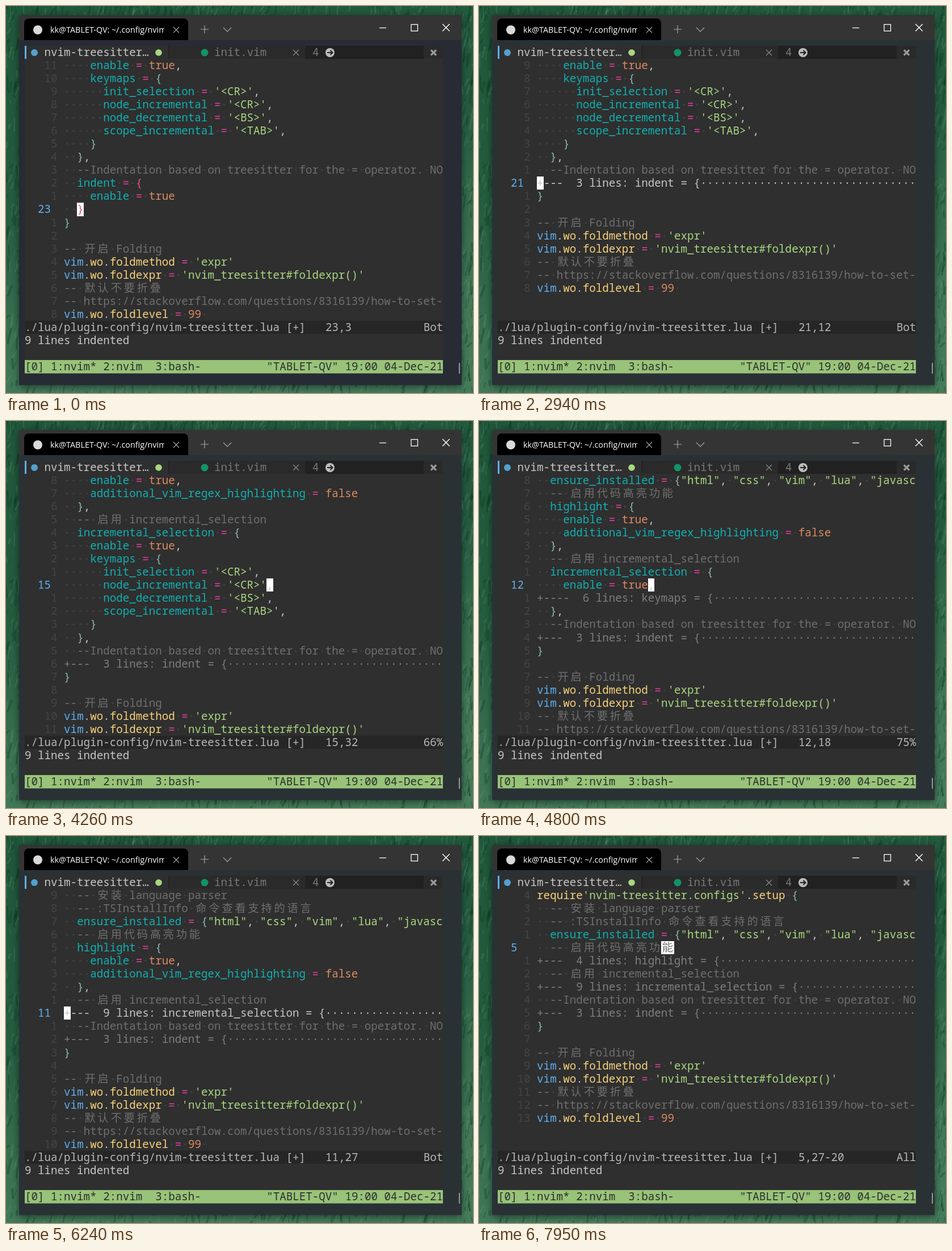
These frames come from a looping animation (823 by 681 pixels, 8 s). An HTML page with a canvas:

```html
<!DOCTYPE html>
<html lang="zh-CN">
<head>
<meta charset="utf-8">
<title>Folding in nvim</title>
<style>
  html, body { margin: 0; width: 100%; height: 100%; overflow: hidden; background: #2b6144; }
  #stage { position: absolute; left: 0; top: 0; width: 823px; height: 681px; overflow: hidden; }
  canvas { position: absolute; left: 0; top: 0; }
  #title { position: absolute; left: 78px; top: 32px; width: 201px; height: 20px; overflow: hidden;
    font: 14.4px/20px "Open Sans", "Noto Sans", sans-serif; color: #fff; white-space: pre; }
  #term { position: absolute; left: 33px; top: 70px; width: 737px; height: 576.5px; overflow: hidden;
    font: 19.2px/21.04px "Noto Sans Mono", "Noto Sans CJK SC", "Noto Sans CJK", "DejaVu Sans Mono", monospace;
    font-variant-ligatures: none; color: #c6c6c6; }
  .line { position: absolute; white-space: pre; height: 23.04px; }
  .wide { display: inline-block; width: 23.04px; text-align: center; }
  .cursor { display: inline-block; height: 23.04px; background: #fff; }
  .comment { color: #6f6f6f; }
  .dot { color: #484848; }
  .field { color: #10b0b2; }
  .string { color: #a9d880; }
  .value { color: #dc8a62; }
  .op { color: #dd3f9c; }
  .brace { color: #8cb6ac; }
  .match { color: #e0558c; }
  .blue { color: #5fb0f2; }
  .yellow { color: #f8d27a; }
  .fold { color: #7e7e7e; }
  .rel { color: #444; }
  .bar { color: #b8b8b8; }
  .tmux { color: #2b2f2b; }
  .dim { color: #777; }
</style>
</head>
<body>
<div id="stage">
  <canvas width="823" height="681"></canvas>
  <div id="title">kk@TABLET-QV: ~/.config/nvim</div>
  <div id="term"></div>
</div>
<script>
const LOOP = 8000, CELL = 11.52, ROW = 23.04, COLS = 58, ROWS = 20;
const term = document.getElementById('term');
const ctx = document.querySelector('canvas').getContext('2d');

const source = `require'nvim-treesitter.configs'.setup {
  -- 安装 language parser
  -- :TSInstallInfo 命令查看支持的语言
  ensure_installed = {"html", "css", "vim", "lua", "javascript"},
  -- 启用代码高亮功能
  highlight = {
    enable = true,
    additional_vim_regex_highlighting = false
  },
  -- 启用 incremental_selection
  incremental_selection = {
    enable = true,
    keymaps = {
      init_selection = '<CR>',
      node_incremental = '<CR>',
      node_decremental = '<BS>',
      scope_incremental = '<TAB>',
    }
  },
  --Indentation based on treesitter for the = operator. NO
  indent = {
    enable = true
  }
}

-- 开启 Folding
vim.wo.foldmethod = 'expr'
vim.wo.foldexpr = 'nvim_treesitter#foldexpr()'
-- 默认不要折叠
-- https://stackoverflow.com/questions/8316139/how-to-set-
vim.wo.foldlevel = 99 `.split('\n');

// first line, last line, level, time of closing
const folds = [[21, 23, 2, 2940], [13, 18, 3, 4470], [11, 19, 2, 6240], [6, 9, 2, 7740]];
const pairs = { 21: 23, 23: 21, 11: 19 };

// time, cursor line, top line
const moves = [
  [0, 23, 12], [1920, 22, 12], [2070, 21, 12], [3150, 20, 12], [3330, 19, 11],
  [3480, 18, 10], [3630, 17, 9], [3810, 16, 8], [4020, 15, 7], [4470, 13, 5],
  [4800, 12, 4], [4920, 11, 3], [5070, 10, 2], [5490, 11, 2], [6750, 10, 2],
  [6900, 9, 1], [7050, 8, 1], [7740, 6, 1], [7950, 5, 1]
];
const SCROLL_OFF = 120, SCROLL_ON = 2280, TINT = 570;
const changes = [...moves.map(m => m[0]), ...folds.map(f => f[3]), SCROLL_OFF, SCROLL_ON, TINT];

const isWide = c => c > '\u2e80';
const bytes = s => new TextEncoder().encode(s).length;

function kind(tok) {
  if (/^['"]/.test(tok)) return 'string';
  if (/^(true|false|\d+)$/.test(tok)) return 'value';
  if (tok === '=') return 'op';
  if (/[{}]/.test(tok)) return 'brace';
  if (tok === 'vim') return 'blue';
  if (/^(require|setup|wo|fold\w+)$/.test(tok)) return 'yellow';
  return /^\w/.test(tok) ? 'field' : '';
}

// a line as a list of [character, class]
function highlight(line) {
  const cells = [], comment = /^\s*--/.test(line);
  const tokens = comment ? [line] : line.match(/'[^']*'|"[^"]*"|\w+|./g) || [];
  for (const tok of tokens) {
    const cls = comment ? 'comment' : kind(tok);
    for (const c of tok) cells.push(c === ' ' ? ['·', 'dot'] : [c, cls]);
  }
  return cells;
}

function span(parent, text, cls) {
  const el = document.createElement('span');
  el.textContent = text;
  el.className = cls;
  parent.append(el);
}

function lineAt(row, col) {
  const el = document.createElement('div');
  el.className = 'line';
  el.style.left = col * CELL + 'px';
  el.style.top = row * ROW + 'px';
  term.append(el);
  return el;
}

const put = (row, col, text, cls = '') => span(lineAt(row, col), text, cls);

function putCells(row, cells, cursorAt) {
  const el = lineAt(row, 6);
  let run = '', runCls = '';
  const flush = () => { if (run) span(el, run, runCls); run = ''; };
  cells.forEach(([c, cls], i) => {
    if (i === cursorAt || isWide(c)) {
      flush();
      span(el, c, cls + (isWide(c) ? ' wide' : '') + (i === cursorAt ? ' cursor' : ''));
      return;
    }
    if (cls !== runCls) flush();
    runCls = cls;
    run += c;
  });
  flush();
}

function ruler(n) {
  const head = source[n - 1].slice(0, -1);
  const col = bytes(head) + 1;
  const virt = [...head].reduce((w, c) => w + (isWide(c) ? 2 : 1), 1);
  return n + ',' + col + (virt === col ? '' : '-' + virt);
}

function position(top, next) {
  const above = top - 1, below = source.length - next + 1;
  if (!below) return above ? 'Bot' : 'All';
  return above ? Math.floor(100 * above / (above + below)) + '%' : 'Top';
}

function drawText(t) {
  term.textContent = '';
  const [, cur, top] = moves.filter(m => m[0] <= t).pop();
  const closed = folds.filter(f => f[3] <= t);
  const foldAt = n => closed.find(f => f[0] === n);

  const shown = [];
  let n = top;
  while (n <= source.length && shown.length < ROWS) {
    shown.push(n);
    n = (foldAt(n) || [0, n])[1] + 1;
  }
  const curRow = shown.indexOf(cur);
  const match = foldAt(cur) ? 0 : pairs[cur];

  shown.forEach((num, i) => {
    const fold = foldAt(num), here = i === curRow;
    if (here) put(i + 1, 2, String(num), 'blue');
    else put(i + 1, 2, String(Math.abs(i - curRow)).padStart(3), 'rel');
    let cells;
    if (fold) {
      const label = '+-' + '-'.repeat(fold[2]) + String(fold[1] - num + 1).padStart(3) +
        ' lines: ' + source[num - 1].trim();
      cells = [...label.padEnd(COLS, '·')].map(c => [c, here ? '' : 'fold']);
    } else {
      cells = highlight(source[num - 1]);
      if (match && (here || num === match))
        cells.forEach(cell => { if (cell[1] === 'brace') cell[1] = 'match'; });
    }
    putCells(i + 1, cells, here ? (fold ? 0 : cells.length - 1) : -1);
  });

  put(0, 3, 'nvim-treesitter…');
  put(0, 29, 'init.vim', 'dim');
  put(0, 44, '4', 'dim');
  put(21, 0, './lua/plugin-config/nvim-treesitter.lua [+]', 'bar');
  put(21, 46, ruler(cur), 'bar');
  put(21, 61, position(top, n), 'bar');
  put(22, 0, '9 lines indented');
  put(24, 0, '[0] 1:nvim* 2:nvim  3:bash-', 'tmux');
  put(24, 37, '"TABLET-QV" 19:00 04-Dec-21', 'tmux');
}

function rect(x, y, w, h, color) {
  ctx.fillStyle = color;
  ctx.fillRect(x, y, w, h);
}

function disc(x, y, r, color) {
  ctx.fillStyle = color;
  ctx.beginPath();
  ctx.arc(x, y, r, 0, 7);
  ctx.fill();
}

function stroke(color, width, ...lines) {
  ctx.strokeStyle = color;
  ctx.lineWidth = width;
  ctx.beginPath();
  for (const pts of lines)
    for (let i = 0; i < pts.length; i += 2) ctx[i ? 'lineTo' : 'moveTo'](pts[i], pts[i + 1]);
  ctx.stroke();
}

const cross = (x, y, r, color, width) =>
  stroke(color, width, [x - r, y - r, x + r, y + r], [x - r, y + r, x + r, y - r]);

function drawDesktop() {
  let seed = 7;
  const rnd = () => (seed = seed * 16807 % 2147483647) / 2147483647;
  const g = ctx.createLinearGradient(0, 0, 150, 681);
  g.addColorStop(0, '#1f573a');
  g.addColorStop(0.5, '#245c3f');
  g.addColorStop(1, '#437b5a');
  rect(0, 0, 823, 681, g);
  ctx.lineCap = 'round';
  for (let i = 0; i < 4200; i++) {
    const x = rnd() * 823, y = rnd() * 690, len = 5 + rnd() * 20, lean = (rnd() - 0.25) * 9;
    const color = rnd() < 0.55 ? 'rgba(10,54,32,.3)' : 'rgba(112,166,128,.2)';
    stroke(color, 1 + rnd() * 3, [x, y, x + lean, y - len]);
  }
  ctx.lineCap = 'butt';
}

function drawWindow(t) {
  ctx.save();
  ctx.shadowColor = 'rgba(0,0,0,.5)';
  ctx.shadowBlur = 12;
  ctx.shadowOffsetY = 3;
  rect(23, 16, 780, 651, t < TINT ? '#272b34' : '#2a3135');
  ctx.restore();
  rect(23, 16, 780, 44, '#343434');

  // title bar
  ctx.fillStyle = '#000';
  ctx.beginPath();
  ctx.roundRect(32, 22, 289, 38, [8, 8, 0, 0]);
  ctx.fill();
  disc(56, 42, 8, '#d9d9d9');
  cross(300, 42, 5, '#a8a8a8', 1.2);
  stroke('#a8a8a8', 1.2, [343, 41, 357, 41], [350, 34, 350, 48]);
  stroke('#a8a8a8', 1.2, [383, 38, 390, 45, 397, 38]);
  stroke('#fff', 1.3, [658, 38.5, 670, 38.5]);
  ctx.strokeRect(714, 32.5, 11.5, 11.5);
  cross(775.5, 38, 6.2, '#fff', 1.4);

  // editor, tab line and bars
  rect(33, 70, 737, 553, '#2f2f2f');
  rect(287, 70, 483, 23, '#2a2a2a');
  rect(286.5, 70, 1.5, 23, '#202020');
  rect(527, 70, 209, 23, '#212121');
  rect(33, 70, 3, 23, '#5fb0f2');
  disc(50, 82, 6, '#51a0cf');
  disc(269, 82, 5.8, '#a9d880');
  disc(350, 82, 6.5, '#12936a');
  cross(511, 82, 5, '#858585', 1.4);
  disc(571, 82, 8, '#bdbdbd');
  stroke('#212121', 2, [566, 82, 575, 82], [571.5, 78, 575.5, 82, 571.5, 86]);
  cross(753.5, 82, 4.6, '#9a9a9a', 3.4);
  rect(33, 70 + 21 * ROW, 737, ROW, '#262626');
  rect(33, 623, 737, 23.5, '#98c379');

  const dim = t >= SCROLL_OFF && t < SCROLL_ON;
  rect(798, 628, 2, 19, dim ? '#53575b' : '#969696');
}

let shownKey = -1;
const start = performance.now();

function frame() {
  const t = (performance.now() - start) % LOOP;
  const key = Math.max(...changes.filter(c => c <= t));
  if (key !== shownKey) {
    shownKey = key;
    drawDesktop();
    drawWindow(t);
    drawText(t);
  }
  requestAnimationFrame(frame);
}
frame();
</script>
</body>
</html>
```
